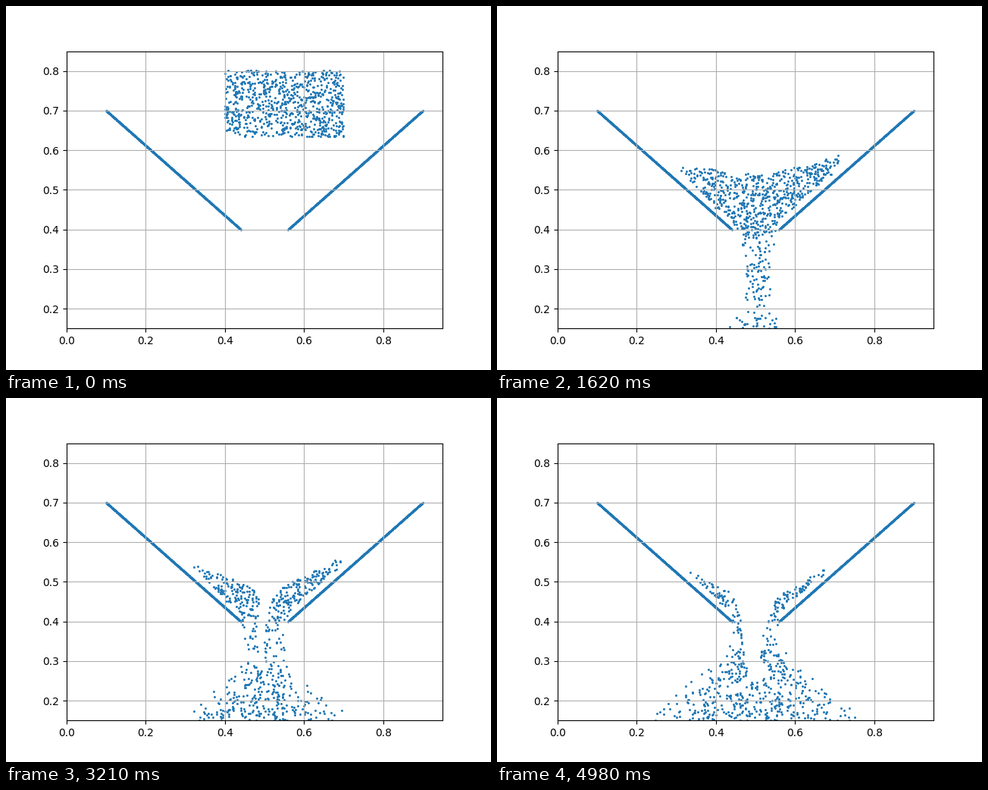
A matplotlib script for the animation above (5010 ms loop, 640 by 480 pixels).

```python
import numpy as np
import matplotlib.pyplot as plt
from matplotlib.animation import FuncAnimation

FRAMES, INTERVAL = 167, 30
SUBSTEPS = 20
DT = INTERVAL / 1000 / SUBSTEPS
GRAVITY = 0.645
BULK, SHEAR, FRICTION = 4.0, 2.0, 0.68
N = 800
DOT = 1.3
NODES = 51
DX = 1 / (NODES - 1)
SCALE = 4 / DX**2
STENCIL = np.arange(3)[:, None]

WALL_TOP, WALL_LIP = np.array([0.1, 0.7]), np.array([0.44, 0.4])


def solid_nodes():
    """Grid nodes held still by the floor and the two hopper walls."""
    axis = np.arange(NODES) * DX
    x, y = np.meshgrid(axis, axis, indexing="ij")
    x = 0.5 - np.abs(x - 0.5)  # both walls share one formula by symmetry
    span = WALL_LIP - WALL_TOP
    length = np.hypot(*span)
    ux, uy = span / length
    rx, ry = x - WALL_TOP[0], y - WALL_TOP[1]
    along = rx * ux + ry * uy
    above = -rx * uy + ry * ux
    wall = (along > 0) & (along < length + 0.005) & (above > -0.035) & (above < 0.018)
    return (wall | (y < 0.105)).ravel()


def simulate():
    """Material point method for dry sand; returns positions per frame."""
    rng = np.random.default_rng(4)
    pos = rng.uniform((0.4, 0.634), (0.7, 0.803), (N, 2))
    vx, vy = np.zeros(N), np.zeros(N)
    cxx, cxy, cyx, cyy = np.zeros((4, N))
    vol = np.ones(N)
    s1, s2 = np.zeros(N), np.zeros(N)  # deviatoric stress: s_xx and s_xy
    free = (~solid_nodes()).astype(float)

    def scatter(idx, values):
        return np.bincount(idx, values.ravel(), NODES * NODES)

    def step():
        nonlocal pos, vx, vy, cxx, cxy, cyx, cyy, vol, s1, s2
        base = (pos / DX - 0.5).astype(int)
        f = pos / DX - base
        w = np.stack([0.5 * (1.5 - f)**2, 0.75 - (f - 1)**2, 0.5 * (f - 0.5)**2])
        w = w[:, None, :, 0] * w[None, :, :, 1]
        dx = ((STENCIL - f[:, 0]) * DX)[:, None]
        dy = ((STENCIL - f[:, 1]) * DX)[None]
        idx = (base[:, 0] + STENCIL)[:, None] * NODES + (base[:, 1] + STENCIL)[None]
        flat = idx.ravel()

        # particles to grid
        p = BULK * np.maximum(1 - vol, 0)
        k = DT * SCALE * vol
        axx, ayy = cxx - k * (s1 - p), cyy + k * (s1 + p)
        axy, ayx = cxy - k * s2, cyx - k * s2
        mass = np.maximum(scatter(flat, w), 1e-12)
        gx = scatter(flat, w * (vx + axx * dx + axy * dy)) / mass
        gy = scatter(flat, w * (vy + ayx * dx + ayy * dy)) / mass
        gx = np.clip(gx, -1.5, 1.5) * free
        gy = np.clip(gy - DT * GRAVITY, -1.5, 1.5) * free

        # grid to particles
        wx, wy = w * gx[idx], w * gy[idx]
        vx, vy = wx.sum((0, 1)), wy.sum((0, 1))
        cxx, cxy = SCALE * (wx * dx).sum((0, 1)), SCALE * (wx * dy).sum((0, 1))
        cyx, cyy = SCALE * (wy * dx).sum((0, 1)), SCALE * (wy * dy).sum((0, 1))
        pos = np.clip(pos + DT * np.stack([vx, vy], 1), 0.05, 0.95)

        # elastic update, then slip where friction is exceeded
        vol = np.clip(vol * (1 + DT * (cxx + cyy)), 0.7, 1.35)
        spin = DT * (cxy - cyx)
        s1, s2 = (s1 + DT * SHEAR * (cxx - cyy) + spin * s2,
                  s2 + DT * SHEAR * (cxy + cyx) - spin * s1)
        limit = FRICTION * BULK * np.maximum(1 - vol, 0)
        slip = np.minimum(1, limit / np.maximum(np.hypot(s1, s2), 1e-12))
        s1, s2 = s1 * slip, s2 * slip

    path = [pos.copy()]
    for _ in range(FRAMES - 1):
        for _ in range(SUBSTEPS):
            step()
        path.append(pos.copy())
    return path


path = simulate()

fig, ax = plt.subplots(figsize=(6.4, 4.8), dpi=100)
ax.set(xlim=(0, 0.95), ylim=(0.15, 0.85), aspect="equal",
       xticks=np.arange(5) * 0.2, yticks=np.arange(2, 9) * 0.1)
ax.xaxis.set_major_formatter("{x:.1f}")
ax.yaxis.set_major_formatter("{x:.1f}")
ax.grid(True)

left = np.linspace(WALL_TOP, WALL_LIP, 600)
right = left * (-1, 1) + (1, 0)
ax.scatter(*np.vstack([left, right]).T, s=DOT, color="C0")
sand = ax.scatter(*path[0].T, s=DOT, color="C0")


def update(i):
    sand.set_offsets(path[i])
    return sand,


anim = FuncAnimation(fig, update, frames=FRAMES, interval=INTERVAL,
                     repeat=True, repeat_delay=0, blit=False)
plt.show()
```
